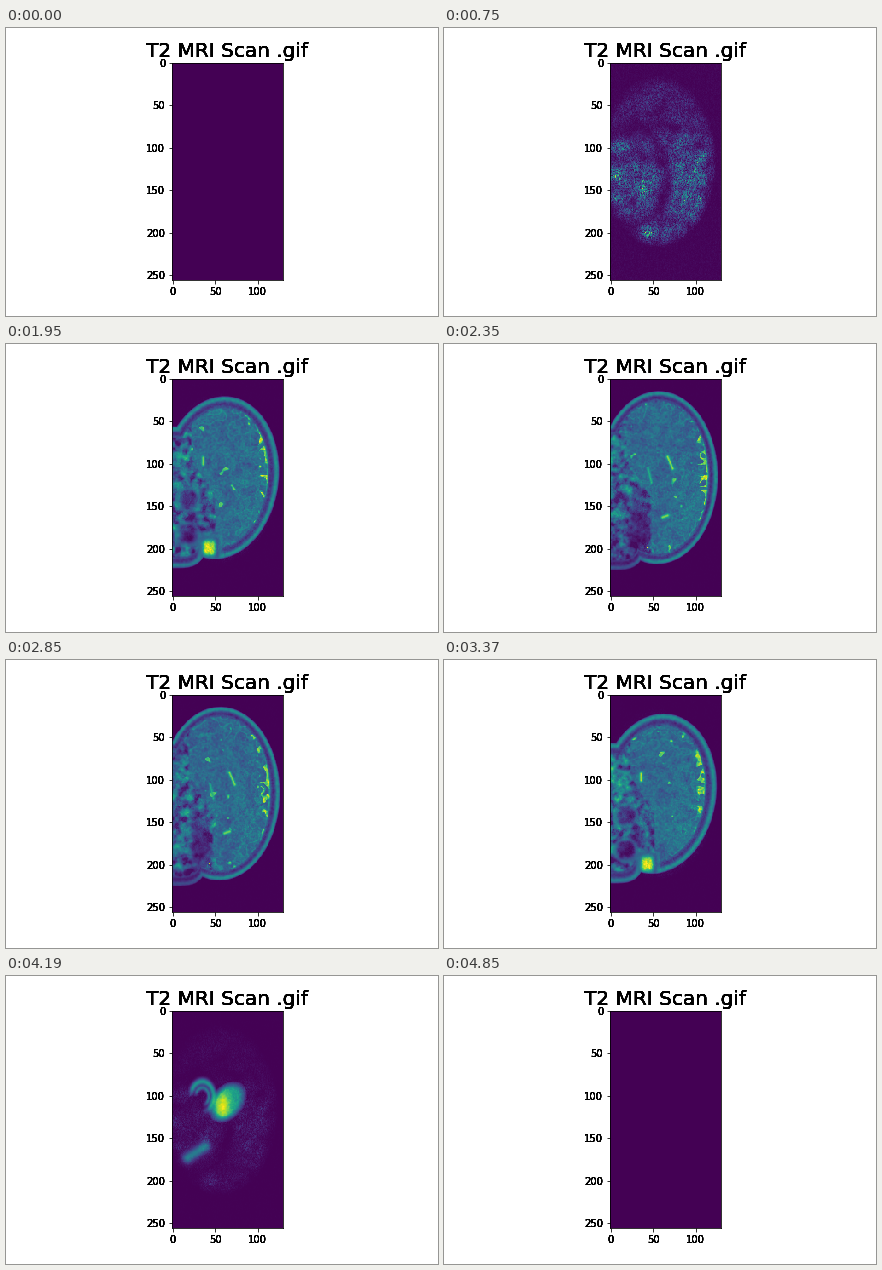
A matplotlib script for the animation above (5.3 s loop, 432 by 288 pixels).

```python
import numpy as np
import matplotlib.pyplot as plt
from matplotlib.animation import FuncAnimation

W, H = 130, 256
LAST = 221          # blank slices at both ends
MIDDLE = 110
STEP_MS, LOOP_MS, HOLD_MS, SLICE_MS = 10, 5300, 450, 20

rng = np.random.default_rng(7)
yy, xx = np.mgrid[:H, :W].astype(float)
theta = np.arctan2(yy - 116.5, xx - 55.5)
crown = np.clip(np.cos(theta + 0.2), 0, 1) ** 2


def ramp(d, width):
    return np.clip(d / width, 0, 1)


def bell(d, width):
    return np.exp(-(d / width) ** 2)


def blob(x, y, rx, ry, power=2):
    return np.exp(-np.abs((xx - x) / rx) ** power - np.abs((yy - y) / ry) ** power)


def stroke(x0, y0, x1, y1, width):
    vx, vy = x1 - x0, y1 - y0
    u = np.clip(((xx - x0) * vx + (yy - y0) * vy) / (vx * vx + vy * vy), 0, 1)
    return bell(np.hypot(xx - x0 - u * vx, yy - y0 - u * vy), width)


def mix(a, b, amount):
    return a + (b - a) * amount


def smooth_noise(sigma):
    fy, fx = np.fft.fftfreq(H)[:, None], np.fft.rfftfreq(W)[None, :]
    gain = np.exp(-2 * (np.pi * sigma) ** 2 * (fx ** 2 + fy ** 2))
    noise = np.fft.irfft2(np.fft.rfft2(rng.normal(size=(H, W))) * gain, s=(H, W))
    return (noise - noise.mean()) / noise.std()


def noise_stack(sigma, spacing=8):
    """Noise that drifts slowly from slice to slice."""
    planes = [smooth_noise(sigma) for _ in range(LAST // spacing + 2)]

    def at(k):
        i, f = k // spacing, k % spacing / spacing
        return ((1 - f) * planes[i] + f * planes[i + 1]) / np.hypot(1 - f, f)
    return at


def section(a, limit, power):
    """Relative size of a rounded body cut at distance a from its middle."""
    return np.sqrt(max(1 - (a / limit) ** power, 1e-6))


def depth_in(x, y, rx, ry, power=2):
    """Distance below the rim of an ellipse, measured along its radius."""
    rho = (np.abs(x / rx) ** power + np.abs(y / ry) ** power) ** (1 / power)
    return np.hypot(x, y) * (1 / rho - 1)


def head_depth(a):
    drift = 12 * min(a / 80, 1) ** 12
    y = yy - 116.5 + drift
    x = xx - 55.5 - drift + 0.15 * (a / 54) ** 2 * y
    return depth_in(x, y, 71 * section(a, 80, 4), 103 * section(a, 80, 2.4))


def jaw_depth(a):
    size = section(a, 72, 4)
    return depth_in(xx + 0.5, yy - 139.5, 45 * size, 86 * size, 4)


grain, lumps, folds = noise_stack(0.8), noise_stack(2.2), noise_stack(3.2)


def make_ghost():
    """Faint echo of the whole head that shows where a slice is empty."""
    inside = ramp(head_depth(0) - 2, 14)
    hollow = bell(np.hypot((xx - 22) / 45, (yy - 135) / 58) - 1, 0.16)
    g = 0.45 + 0.35 * blob(95, 140, 24, 60) + 0.3 * blob(40, 140, 22, 30)
    g *= (1 - 0.5 * ramp(95 - yy, 20)) * (1 - 0.8 * hollow)
    g *= np.clip(1 + 0.3 * smooth_noise(4), 0.2, 2)
    for y in (98, 133, 160):
        g += 0.7 * blob(8, y, 12, 6)
    g += 0.9 * blob(43, 201, 9, 10)
    return g * inside + 0.05


ghost = make_ghost()


def speckle(k):
    n = np.random.default_rng(k).normal(size=(2, H, W))
    n = n + 0.7 * np.roll(n, 1, axis=1)
    return ghost * np.hypot(*n)


def draw_shell(layer, a, fine):
    """Scalp, skull and, towards the sides, muscle."""
    shell = 0.12 + 0.35 * bell(layer - 0.3, 0.24) + 0.1 * bell(layer - 1, 0.12)
    shell += 0.22 * bell(layer - 0.74, 0.1) * ramp(a - 44, 10)
    return mix(shell, 0.5, ramp(a - 62, 10)) + 0.02 * fine


def draw_tissue(a, lump, fine):
    """Neck and face with their cavities."""
    t = 0.24 + 0.12 * lump + 0.04 * fine + 0.12 * blob(5, 95, 22, 35)
    t += 0.25 * blob(8, 198, 25, 12) * bell(a - 56, 14)
    t = mix(np.maximum(t, 0.05), 0.45, ramp(a - 66, 10))
    for y in (142, 183):
        rim = bell(np.hypot(xx - 18, yy - y) - 13, 2.5)
        t = mix(t, 0.42, 0.7 * rim * bell(a - 37, 11))
        t *= 1 - 0.75 * bell(a - 37, 11) * blob(18, y, 10, 11, 4)
    t *= 1 - 0.8 * bell(a - 54, 10) * blob(29, 103, 11, 19, 4)
    return t * (1 - 0.7 * bell(a - 14, 20) * blob(33, 175, 13, 35, 4))


def draw_brain(depth, spread, lump, fold, fine):
    cortex = bell(depth, 22)
    brain = 0.31 + 0.03 * fine + 0.02 * fold + 0.05 * min(spread, 1)
    brain += 0.08 * bell(fold, 0.25) * (0.4 + cortex)
    brain += 0.4 * ramp(lump - 2.1, 0.5)
    # fluid reaches inwards between the folds
    spikes = np.abs(np.cos(8 * theta + 0.8 * fold)) ** 6
    reach = crown * (4 + 11 * spikes) * (1 - 0.6 * min(spread, 1))
    return mix(brain, 0.8 + 0.08 * fine, 0.9 * ramp(reach - depth - 1, 2))


def draw_fluid(img, a):
    mid, side, corner = bell(a - 14, 12), bell(a - 37, 7), bell(a - 54, 6)
    img = mix(img, 0.8, mid * stroke(67, 92, 73, 106, 1.8))
    img = mix(img, 0.8, mid * stroke(61, 163, 67, 161, 2))
    img = mix(img, 0.6, mid * stroke(44, 105, 48, 122, 1.5))
    img = mix(img, 0.85, side * stroke(36, 93, 36, 101, 1.8))
    return mix(img, 1, corner * stroke(62, 141, 82, 146, 2))


def draw_eye(img, a, fine):
    size = section(abs(a - 35), 11, 2)
    img = mix(img, 0.45, blob(44, 199, 14 * size, 15 * size, 6))
    img = mix(img, 0.12, blob(44, 199, 11 * size, 13 * size, 6))
    return mix(img, 0.88 + 0.04 * fine, blob(43, 199, 8 * size, 10 * size, 4))


def draw_ear():
    ex, ey = xx - 35, yy - 101
    r = np.hypot(ex * 1.05, ey * 0.8)
    gap = ramp(np.cos(np.arctan2(ey, ex) + 0.8) + 0.75, 0.7)
    return gap * (0.5 * bell(r - 14, 3) + 0.35 * bell(r - 8, 2))


ear = draw_ear()
cheek = 0.4 * stroke(18, 173, 38, 160, 6)


def scan(k):
    if k in (0, LAST):
        return np.zeros((H, W))
    a = abs(k - MIDDLE)
    fine, lump, fold = grain(k), lumps(k), folds(k)
    head, jaw = head_depth(a), jaw_depth(a)
    depth = np.maximum(head, jaw)
    body = ramp(depth, 1.5 + 8 * (min(a, 90) / 78) ** 8)

    spread = (a / 54) ** 4
    wall = 11 + 11 * min(spread, 2)
    img = mix(draw_shell(depth / wall, a, fine), draw_tissue(a, lump, fine),
              ramp(depth - wall, 2))
    img *= 1 - 0.6 * ramp(yy - 200, 20) * ramp(45 - xx, 10) * bell(a, 30)

    left = 18 + 28 * ramp(yy - 95, 45) + 18 * spread
    front = 222 - 75 * spread
    inner = ramp(head - wall, 2) * ramp(xx - left, 3) * ramp(front - yy, 3)
    brain = draw_brain(head - wall, spread, lump, fold, fine)
    img = draw_fluid(mix(img, brain, inner), a)
    img = draw_eye(img, a, fine) + 0.5 * blob(59, 112, 9, 17) * bell(a - 80, 6)

    img = np.maximum(img, 0) * body
    img += (ear + cheek) * bell(a - 79, 7) * (1 - 0.7 * body)
    img += 0.035 * speckle(k)
    return np.clip(img / min(img.max(), 1), 0, 1)


slices = [scan(k).astype(np.float32) for k in range(LAST + 1)]

fig = plt.figure(figsize=(6, 4), dpi=72, facecolor="white")
fig.subplots_adjust(left=.125, right=.9, bottom=.125, top=.88)
ax = fig.add_subplot()
picture = ax.imshow(slices[0], cmap="viridis", vmin=0, vmax=1, interpolation="nearest")
x_marks, y_marks = range(0, 101, 50), range(0, 251, 50)
ax.set_xticks(x_marks)
ax.set_yticks(y_marks)
ax.tick_params(labelbottom=False, labelleft=False)

# Text is laid down several times so that its soft edges turn solid.
box_h = 0.755 * 288
box_w = box_h * W / H
for _ in range(7):
    ax.text(.5, 1 + 6 / box_h, "T2 MRI Scan .gif", fontsize=20, ha="center",
            va="baseline", transform=ax.transAxes)
    for v in x_marks:
        ax.text(v, -7 / box_h, str(v), ha="center", va="top",
                transform=ax.get_xaxis_transform())
    for v in y_marks:
        ax.text(-7 / box_w, v, str(v), ha="right", va="center_baseline",
                transform=ax.get_yaxis_transform())


def update(i):
    t = i * STEP_MS
    k = 0 if t < HOLD_MS else min((t - HOLD_MS) // SLICE_MS + 1, LAST)
    picture.set_data(slices[k])
    return [picture]


anim = FuncAnimation(fig, update, frames=LOOP_MS // STEP_MS, interval=STEP_MS,
                     repeat=True, cache_frame_data=False)
plt.show()
```
